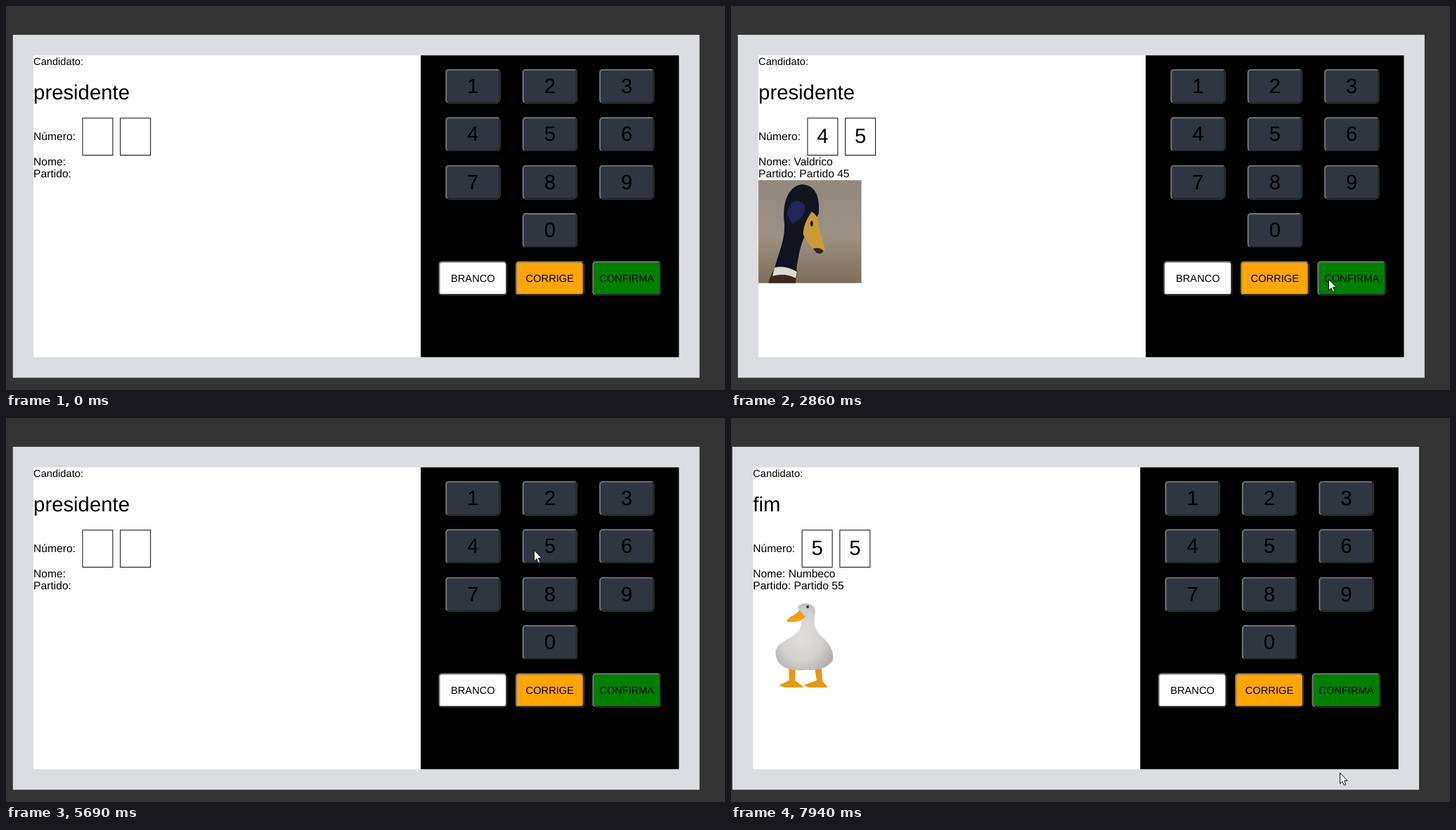
These frames come from a looping animation (1023x547 px, 8 s). An HTML page:

```html
<!DOCTYPE html>
<html lang="pt-BR">
<head>
<meta charset="utf-8">
<title>Urna</title>
<style>
  html, body { margin: 0; width: 100%; height: 100%; overflow: hidden; background: #333433; }
  svg { display: block; width: 1023px; height: 547px; font-family: 'Liberation Sans', Arial, sans-serif; }
  text { text-rendering: geometricPrecision; }
  .mid { text-anchor: middle; }
  .bevel { fill: #767676; }
  .bevel.shade { fill: #222; clip-path: url(#corner); }
  .down .bevel { fill: #222; }
  .down .bevel.shade { fill: #767676; }
</style>
</head>
<body>
<svg viewBox="0 0 1023 547">
  <defs>
    <clipPath id="corner" clipPathUnits="objectBoundingBox"><path d="M0 1L1 0V1Z"/></clipPath>
    <linearGradient id="sand" x2="0" y2="1">
      <stop stop-color="#92887f"/><stop offset=".55" stop-color="#9c9184"/><stop offset="1" stop-color="#7d6d5b"/>
    </linearGradient>
    <radialGradient id="down" cx=".45" cy=".5" r=".6">
      <stop stop-color="#e0dfdd"/><stop offset=".6" stop-color="#d3d2d0"/><stop offset="1" stop-color="#b2b0ad"/>
    </radialGradient>
  </defs>
  <g id="urn"></g>
  <path id="cursor" d="M.5 .5V16L4 12.7 6.4 18.2 8.8 17.2 6.5 11.7H11.2Z" fill="#fff" stroke="#111"/>
</svg>
<script>
const LOOP = 8000, STEP = 67, RESET = 5150, ENTER = 130;
const SCALE = .977, SHIFT = -8;
const urn = document.getElementById('urn');
const cursor = document.getElementById('cursor');

function add(markup) {
  urn.insertAdjacentHTML('beforeend', markup);
  return urn.lastElementChild;
}
const rect = (x, y, w, h, fill, more = '') =>
  `<rect x="${x}" y="${y}" width="${w}" height="${h}" fill="${fill}" ${more}/>`;
const text = (x, y, size, str = '', cls = '') =>
  `<text x="${x}" y="${y}" font-size="${size}" class="${cls}">${str}</text>`;

function button(cx, cy, w, fill, label, size, baseline) {
  const x = cx - w / 2, y = cy - 25;
  return add('<g>' +
    rect(x, y, w, 50, '', 'rx="5" class="bevel"') +
    rect(x, y, w, 50, '', 'rx="5" class="bevel shade"') +
    rect(x + 2, y + 2, w - 4, 46, fill, 'rx="3"') +
    text(cx, baseline, size, label, 'mid') + '</g>');
}

// Machine and screen, in page pixels
add(rect(10, 42, 1000, 500, '#dcdde1'));
add(rect(40, 72, 564, 440, '#fff'));
add(rect(604, 72, 376, 440, '#000'));
add(text(40, 86, 15, 'Candidato:'));
const title = add(text(40, 136, 30));
add(text(40, 195, 16, 'Número:'));
const slots = [111, 166].map(x => {
  add(rect(x + .5, 163.5, 44, 54, '#fff', 'stroke="#000"'));
  return add(text(x + 22.5, 200, 30, '', 'mid'));
});
const nameLine = add(text(40, 232, 16));
const partyLine = add(text(40, 250, 16));

// Keypad
const keys = {};
const column = i => 680 + 112 * i;
[...'1234567890'].forEach((n, i) => {
  const cy = 117 + 70 * Math.floor(i / 3);
  keys[n] = button(column(n === '0' ? 1 : i % 3), cy, 80, '#2f3640', n, 30, cy + 10);
});
Object.entries({ BRANCO: '#fff', CORRIGE: 'orange', CONFIRMA: 'green' }).forEach(([label, fill], i) => {
  keys[label] = button(column(i), 397, 100, fill, label, 15, 402);
});

const picture = shapes => add(`<g transform="translate(40 254) scale(1.02)">${shapes}</g>`);
const candidates = {
  45: { name: 'Valdrico', pic: picture(`
    <rect width="147" height="147" fill="url(#sand)"/>
    <path d="M14 147Q18 134 24 124L56 130Q53 138 53 147Z" fill="#3c2820"/>
    <path d="M23 127C28 104 38 88 37 62C33 30 44 6 64 6C82 8 88 24 86 48L72 72C62 82 57 104 54 132Z" fill="#12141f"/>
    <path d="M41 50C42 28 58 24 66 36C68 50 58 58 48 62Z" fill="#25245a"/>
    <path d="M23 125Q38 121 55 131L53 140Q38 132 20 137Z" fill="#ded9d2"/>
    <path d="M76 45Q86 50 86 66L95 98Q94 106 84 104Q72 94 64 78Q63 64 76 45Z" fill="#c99b35"/>
    <path d="M78 98Q87 95 93 101Q90 107 83 104Z" fill="#292318"/>
    <ellipse cx="76" cy="62" rx="2" ry="4" fill="#151515"/>`) },
  55: { name: 'Numbeco', pic: picture(`
    <path d="M51 108L52 126 37 133 45 136H73L60 126 61 108ZM88 108L91 126 72 133 80 136H107L99 127 98 108Z" fill="#e8970f"/>
    <path d="M64 20C74 12 89 16 89 29C86 46 88 54 99 64C110 74 116 84 114 98C104 110 92 112 76 111C55 114 38 107 35 97C29 84 34 76 43 71C59 62 70 56 69 42Z" fill="url(#down)"/>
    <path d="M67 26L75 35Q66 45 48 42Q50 36 58 33Z" fill="#f0a01c"/>
    <circle cx="78" cy="21" r="2" fill="#333"/>`) }
};

// Each click types on release, one step after the press
const clicks = [['4', 600], ['5', 1013], ['CONFIRMA', 3650], ['5', 5900], ['5', 6300], ['CONFIRMA', 7400]];

// start, end, x, y: the pointer eases to each place and waits there
const moves = [
  [70, 600, 672, 190], [670, 935, 753, 196], [1080, 1420, 712, 500],
  [1970, 2050, 703, 535], [2050, 2300, 819, 393], [2520, 2850, 850, 389],
  [3717, 4000, 913, 483], [4340, 4600, 735, 556], [RESET, 5680, 751, 188],
  [5700, 5890, 768, 182], [6434, 7050, 880, 393], [7467, 7930, 866, 505]
];

function pointerAt(t) {
  let x = 931, y = 421;
  for (const [start, end, toX, toY] of moves) {
    if (t < start) break;
    const q = Math.floor((t - start) / STEP) * STEP;
    const k = Math.min(1, q / (end - start));
    const ease = k * k * (3 - 2 * k);
    x += (toX - x) * ease;
    y += (toY - y) * ease;
  }
  return [Math.round(x), Math.round(y)];
}

function voteAt(t) {
  const vote = { typed: '', loaded: false, done: false };
  for (const [key, pressed] of clicks) {
    const released = pressed + STEP;
    if (t < released || (t >= RESET && pressed < RESET)) continue;
    if (key === 'CONFIRMA') vote.done = true;
    else vote.typed += key;
    vote.loaded = t >= released + STEP;
  }
  vote.loaded ||= vote.done;
  return vote;
}

function draw(t) {
  const { typed, loaded, done } = voteAt(t);
  const chosen = candidates[typed];
  urn.setAttribute('transform', `scale(${SCALE}) translate(${done ? SHIFT : 0} 0)`);
  title.textContent = done ? 'fim' : 'presidente';
  slots.forEach((slot, i) => slot.textContent = typed[i] || '');
  nameLine.textContent = 'Nome: ' + (chosen ? chosen.name : '');
  partyLine.textContent = 'Partido: ' + (chosen ? 'Partido ' + typed : '');
  for (const c of Object.values(candidates))
    c.pic.style.visibility = c === chosen && loaded ? 'visible' : 'hidden';
  for (const id in keys)
    keys[id].classList.toggle('down', clicks.some(([key, at]) => key === id && t >= at && t < at + STEP));
  cursor.style.visibility = t < ENTER ? 'hidden' : 'visible';
  cursor.setAttribute('transform', `translate(${pointerAt(t)})`);
}

const begin = performance.now();
function tick() {
  draw((performance.now() - begin) % LOOP);
  requestAnimationFrame(tick);
}
tick();
</script>
</body>
</html>
```
